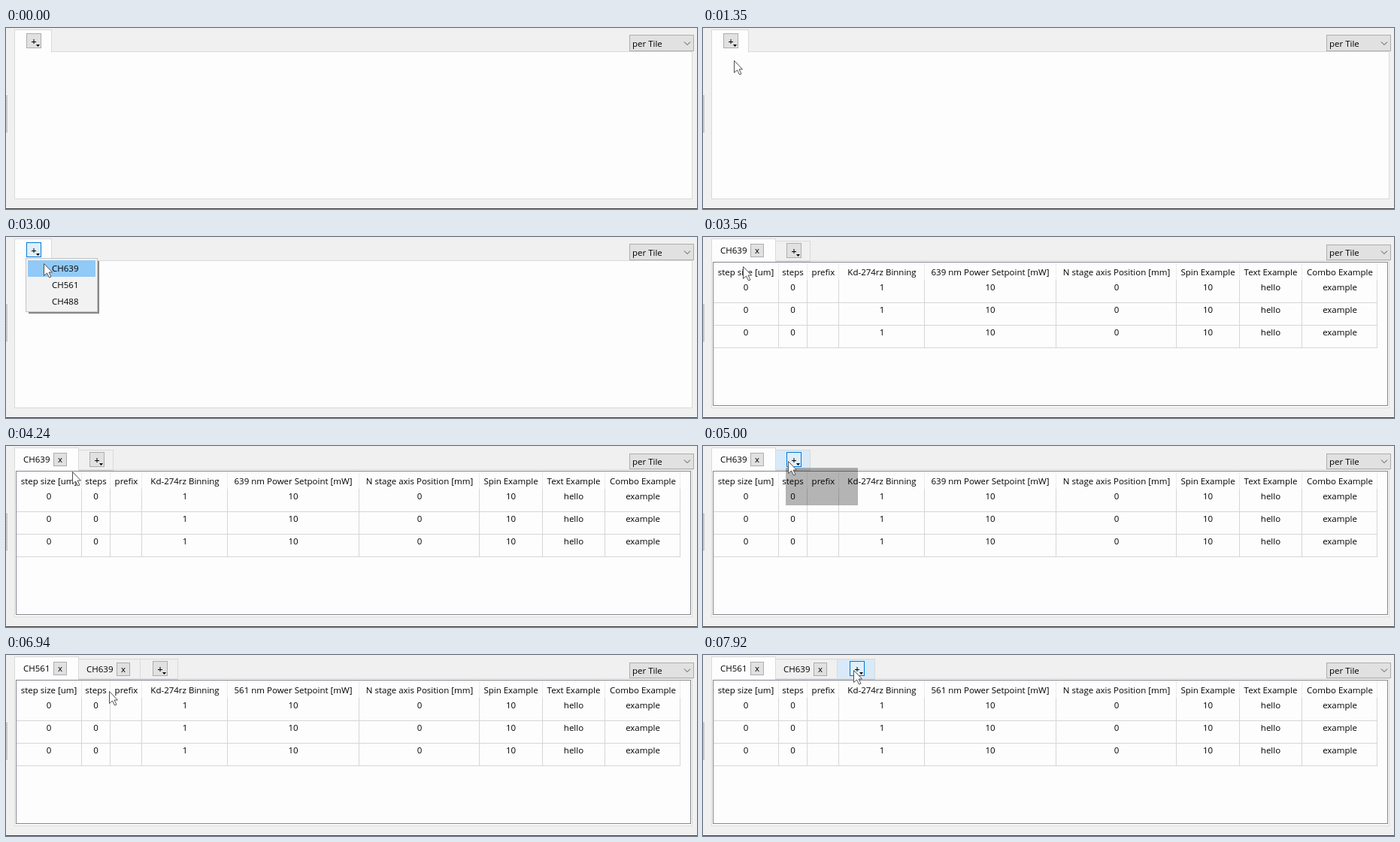
An HTML page with a canvas that plays this animation: 919x241 px, repeating every 8000 ms.

```html
<!DOCTYPE html>
<html lang="en">
<head>
<meta charset="utf-8">
<title>Channel tabs</title>
<style>
html, body { margin: 0; width: 100%; height: 100%; overflow: hidden; background: #f0f0f0; }
canvas { display: block; }
</style>
</head>
<body>
<canvas id="stage" width="919" height="241"></canvas>
<script>
const c = document.getElementById('stage').getContext('2d');
const LOOP = 8000, INK = '#000', BACK = '#f0f0f0', PAPER = '#fdfdfd';
const EDGE = '#dadada', GRID = '#d6d6d6', FRAME = '#828790', BUTTON = '#e1e1e1', RIM = '#adadad';

// Moments of the hard changes
const FIRST_TAB = 3540, SECOND_TAB = 6280;
const menus = [
  { x: 26, y: 28, items: ['CH639', 'CH561', 'CH488'], open: 2380, faint: 2430, full: 2480, close: FIRST_TAB },
  { x: 110, y: 29, items: ['CH561', 'CH488'], open: 4980, faint: 5100, full: 5180, close: SECOND_TAB }
];

// Place of the plus button and its tab in each stage
const plus = [
  { x: 27, y: 7, tab: 11, w: 50 },
  { x: 111, y: 8, tab: 96, w: 47 },
  { x: 195, y: 8, tab: 178, w: 51 }
];

// Pointer tip: time, x, y
const path = [
  [860, -14, 68], [1300, 40, 44], [1350, 41, 43], [1630, 42, 35], [1730, 42, 34], [2100, 43, 26],
  [2580, 43, 26], [3260, 53, 39], [3560, 53, 39], [4340, 90, 34], [4500, 116, 3], [4620, 133, 14],
  [4800, 113, 20], [5100, 113, 20], [5700, 131, 50], [5800, 131, 50], [5960, 129, 43], [6320, 129, 43],
  [7080, 138, 49], [7420, 221, 4], [7820, 199, 15], [7900, 199, 15], [7920, 200, 20]
];

// Label, centre, right edge, value
const columns = [
  ['step size [um]', 57, 100, '0'], ['steps', 119.5, 138, '0'], ['prefix', 160, 180, ''],
  ['Kd-274rz Binning', 238, 294, '1'], ['', 382, 469, '10'],
  ['N stage axis Position [mm]', 550, 629, '0'], ['Spin Example', 671.5, 713, '10'],
  ['Text Example', 755, 796, 'hello'], ['Combo Example', 847, 896, 'example']
];

function fill(x, y, w, h, color) {
  c.fillStyle = color;
  c.fillRect(x, y, w, h);
}

function box(x, y, w, h, color, edge) {
  fill(x, y, w, h, edge);
  fill(x + 1, y + 1, w - 2, h - 2, color);
}

function text(s, x, y, align = 'left', color = INK) {
  c.fillStyle = color;
  c.textAlign = align;
  c.fillText(s, x, y);
}

function shape(points, color, edge) {
  c.beginPath();
  points.forEach(([x, y]) => c.lineTo(x, y));
  c.closePath();
  c.fillStyle = color;
  c.fill();
  if (edge) {
    c.strokeStyle = edge;
    c.stroke();
  }
}

function pointerAt(t) {
  const i = path.findIndex(p => p[0] > t);
  if (i === 0) return [-30, 68];
  if (i < 0) return path[path.length - 1].slice(1);
  const [t0, x0, y0] = path[i - 1], [t1, x1, y1] = path[i];
  const k = (t - t0) / (t1 - t0), e = k * k * (3 - 2 * k);
  return [Math.round(x0 + (x1 - x0) * e), Math.round(y0 + (y1 - y0) * e)];
}

function pointer(x, y) {
  const outline = [[0, 0], [0, 16], [4, 12.5], [7, 18.5], [9.5, 17.5], [6.5, 11.5], [11, 11.5]];
  shape(outline.map(([a, b]) => [x + a + .5, y + b + .5]), '#fff', '#505050');
}

function tab(x, w, active, color = active ? PAPER : BACK) {
  const y = active ? 2 : 5;
  box(x, y, w, 33 - y, color, EDGE);
  fill(x + 1, 31, w - 2, 2, active ? PAPER : EDGE);
}

function closeTab(x, name, active, hot) {
  tab(x, active ? 86 : 83, active, hot ? '#d8eaf9' : undefined);
  const left = active ? 23 : 107, y = active ? 9 : 10;
  text(name, left, y + 13);
  box(left + 40, y, 18, 18, BUTTON, RIM);
  text('x', left + 49, y + 13, 'center');
}

function plusButton(x, y, hot) {
  box(x, y, 20, 20, hot ? '#e0eff9' : BUTTON, hot ? '#0078d7' : RIM);
  fill(x + 7, y + 11, 6, 1, INK);
  fill(x + 9.5, y + 8, 1, 6, INK);
  shape([[x + 13, y + 15], [x + 18, y + 15], [x + 15.5, y + 18]], INK);
}

function combo(y) {
  box(829, y, 86, 31 - y, BUTTON, RIM);
  text('per Tile', 833, 25);
  c.strokeStyle = '#505050';
  c.beginPath();
  c.moveTo(902, 18.5);
  c.lineTo(906, 22.5);
  c.lineTo(910, 18.5);
  c.stroke();
}

function table(power) {
  box(13, 33, 898, 192, PAPER, FRAME);
  for (const [label, mid, right, value] of columns) {
    fill(right, 34, 1, 23, '#ececec');
    fill(right, 57, 1, 91, GRID);
    text(label || power + ' nm Power Setpoint [mW]', mid, 51, 'center');
    for (let y = 71; y < 140; y += 30) text(value, mid, y, 'center');
  }
  for (let y = 87; y < 150; y += 30) fill(14, y, 883, 1, GRID);
}

function menu({ x, y, items, open, faint, full, close }, t, py) {
  if (t < open || t >= close) return;
  const w = 96, h = items.length * 22 + 6;
  if (t < faint) {
    c.globalCompositeOperation = 'multiply';
    fill(x, y, w, h, '#b6b6b6');
    c.globalCompositeOperation = 'source-over';
    return;
  }
  const solid = t >= full;
  fill(x + 4, y + 4, w - 2, h - 2, solid ? '#0007' : '#0002');
  box(x, y, w, h, solid ? '#f2f2f2' : '#f8f8f8', solid ? '#c4c4c4' : '#e4e4e4');
  items.forEach((name, i) => {
    const top = y + 3 + i * 22;
    if (solid && py >= top && py < top + 22) fill(x + 3, top, w - 6, 22, '#91c9f7');
    text(name, x + 35, top + 15, 'left', solid ? INK : '#ccc');
  });
}

function draw(t) {
  const stage = t < FIRST_TAB ? 0 : t < SECOND_TAB ? 1 : 2;
  const [px, py] = pointerAt(t);
  const isOpen = menus.some(m => t >= m.open && t < m.close);
  const over = (x, y, w, h) => px >= x && px < x + w && py >= y && py < y + h;
  const add = plus[stage];

  c.font = '11.5px "Open Sans", "Noto Sans", sans-serif';
  c.lineWidth = 1;
  fill(0, 0, 919, 241, BACK);
  fill(0, 240, 919, 1, '#404040');
  for (let y = 90; y < 140; y += 2) fill(0, y, 2, 1, '#a0a0a0');
  box(11, 31, 902, 197, PAPER, EDGE);

  if (stage === 0) {
    tab(add.tab, add.w, true);
  } else {
    const hotTab = isOpen || over(add.tab, 5, add.w, 28);
    table(stage === 1 ? 639 : 561);
    if (stage === 2) closeTab(96, 'CH639', false, over(96, 5, 83, 28));
    tab(add.tab, add.w, false, hotTab ? '#d8eaf9' : BACK);
    closeTab(11, stage === 1 ? 'CH639' : 'CH561', true);
    fill(13, 33, 898, 1, FRAME);
  }
  plusButton(add.x, add.y, isOpen || over(add.x, add.y, 20, 20));
  combo(stage ? 10 : 9);
  menus.forEach(m => menu(m, t, py));
  pointer(px, py);
}

const start = performance.now();
function tick() {
  draw((performance.now() - start) % LOOP);
  requestAnimationFrame(tick);
}
tick();
</script>
</body>
</html>
```
